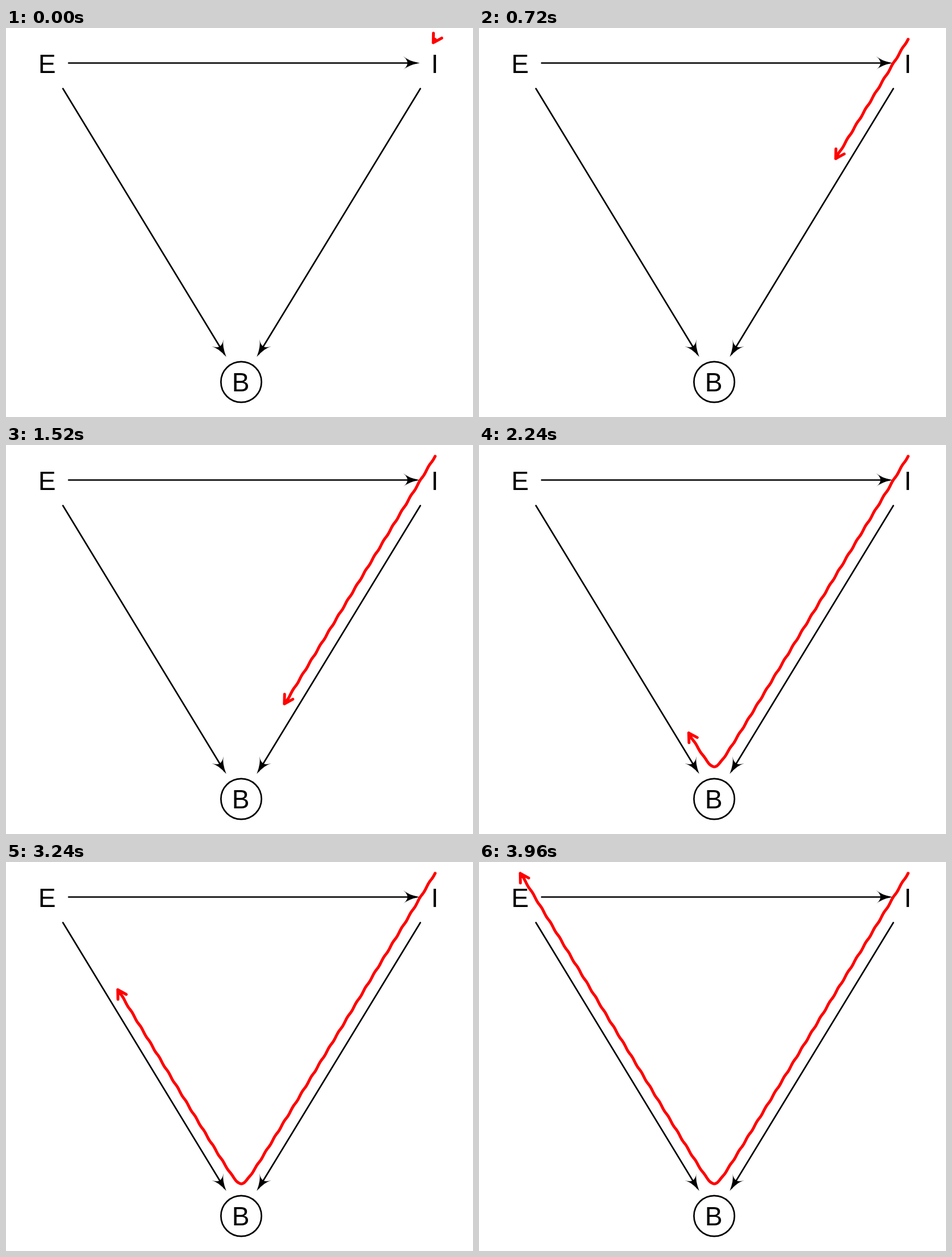
Animation of 820 by 683 pixels, one loop 4 s. Source, as an HTML page:

```html
<!DOCTYPE html>
<html lang="en">
<head>
<meta charset="utf-8">
<title>Path from I through B to E</title>
<style>
  html, body { margin: 0; width: 100%; height: 100%; overflow: hidden; background: #fff; }
  svg { display: block; width: 100vw; height: 100vh; }
  text { font: 46px "Liberation Sans", Arial, sans-serif; text-anchor: middle; }
  .edge { fill: none; stroke: #000; stroke-width: 2.7; stroke-linecap: round; }
  #trace { fill: none; stroke: #f00; stroke-width: 5; stroke-linecap: round; stroke-linejoin: round; }
</style>
</head>
<body>
<svg viewBox="0 0 820 683">
  <defs>
    <path id="head" d="M0 0Q-20 -3.5 -29 -12Q-22 -6 -21.5 0Q-22 6 -29 12Q-20 3.5 0 0Z"/>
  </defs>
  <path class="edge" d="M110 61.5H720M100 106.5L383 572M727.5 106.5L444 572"/>
  <use href="#head" transform="translate(726.5 61.5)"/>
  <use href="#head" transform="translate(386.7 577.5) rotate(58.7)"/>
  <use href="#head" transform="translate(440.3 577.5) rotate(121.3)"/>
  <circle class="edge" cx="413" cy="621.5" r="35.6"/>
  <text x="72.2" y="79">E</text>
  <text x="753" y="79">I</text>
  <text x="412" y="638">B</text>
  <path id="trace"/>
</svg>
<script>
const FRAME_MS = 40, FRAMES = 100;
const START_X = 753.5, APEX_X = 413, APEX_Y = 565;
const SLOPE = 1.65, ROUNDING = 10;
const HEAD_LENGTH = 17, HEAD_ANGLE = Math.PI / 6;
const trace = document.getElementById('trace');

// A rounded V with a slight hand-drawn ripple.
function curveY(x) {
  const d = x - APEX_X;
  const ripple = Math.tanh(d / 20) * Math.sin(2 * Math.PI * (x - (d > 0 ? 643 : 305)) / 15.9);
  return APEX_Y - SLOPE * (Math.hypot(d, ROUNDING) - ROUNDING) - ripple;
}

// The tip leads by half a step on the way down and loses that lead around the turn.
function tipX(step) {
  const lead = 3.3 * Math.min(1, Math.max(0, (56 - step) / 14));
  return START_X - 6.88 * step - lead;
}

const point = (x, y) => `${x.toFixed(2)} ${y.toFixed(2)}`;

function draw(step) {
  const x = tipX(step), y = curveY(x);
  const shaft = [];
  for (let px = START_X; px > x; px -= 2) shaft.push(point(px, curveY(px)));
  shaft.push(point(x, y));

  const d = x - APEX_X;
  const back = Math.atan2(-SLOPE * d / Math.hypot(d, ROUNDING), 1);
  const barb = turn => point(x + HEAD_LENGTH * Math.cos(back + turn),
                             y + HEAD_LENGTH * Math.sin(back + turn));
  trace.setAttribute('d',
    `M${shaft.join('L')}M${barb(-HEAD_ANGLE)}L${point(x, y)}L${barb(HEAD_ANGLE)}`);
}

function tick() {
  draw(Math.floor(performance.now() / FRAME_MS) % FRAMES);
  requestAnimationFrame(tick);
}
tick();
</script>
</body>
</html>
```
